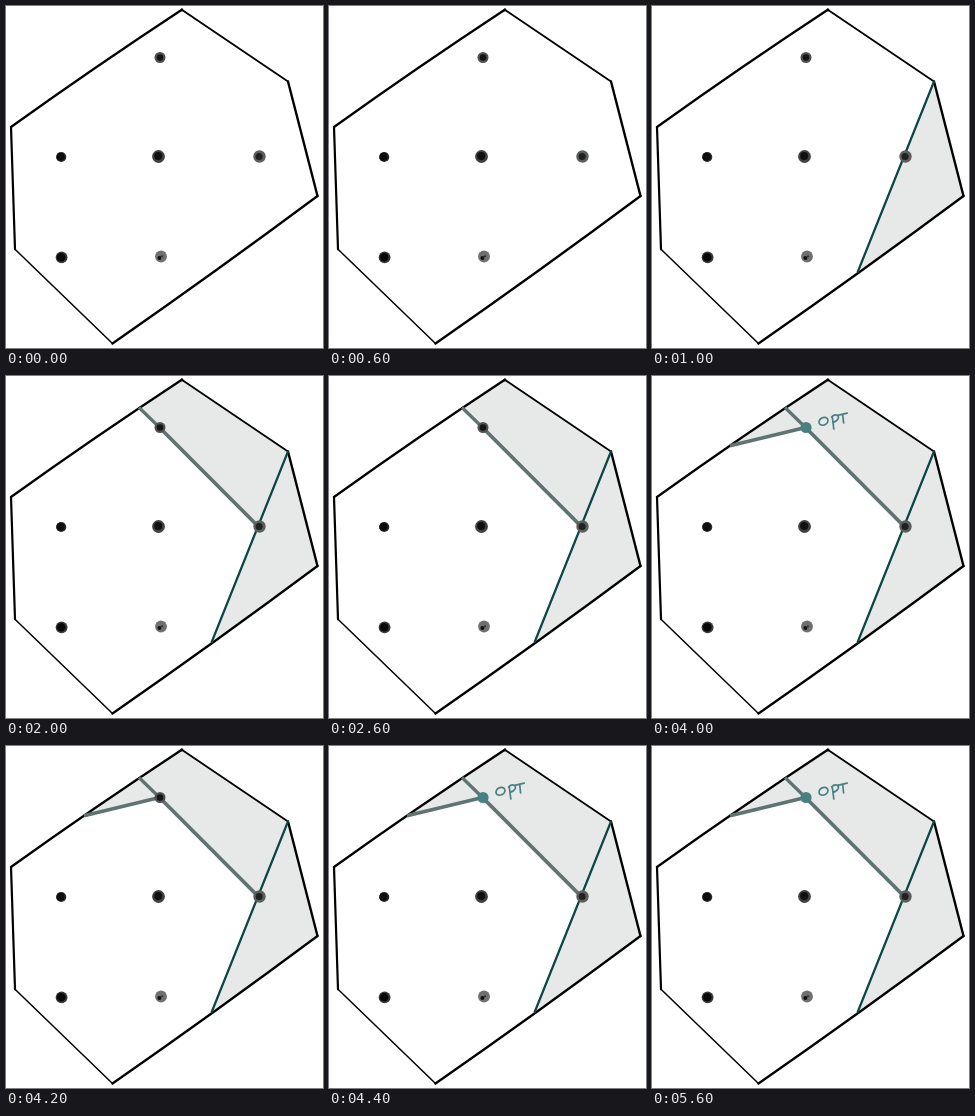
An HTML page with a canvas for the animation above (6.4 s loop, 317 px wide and 342 px high).

```html
<!DOCTYPE html>
<html lang="en">
<head>
<meta charset="utf-8">
<title>Cutting a polygon</title>
<style>
html, body { margin: 0; width: 100%; height: 100%; overflow: hidden; background: #fff; }
canvas { display: block; width: 317px; height: 342px; }
</style>
</head>
<body>
<canvas id="stage" width="317" height="342"></canvas>
<script>
const canvas = document.getElementById('stage');
const ctx = canvas.getContext('2d');
const scale = window.devicePixelRatio || 1;
canvas.width = 317 * scale;
canvas.height = 342 * scale;

const LOOP = 6400;
const INK = '#000', SHADE = '#e7e9e8', TEAL = '#0b4645', SLATE = '#5f7372', MARK = '#478083';

// Corners of the polygon, clockwise from the peak
const peak = [175.8, 3.8], right = [282, 75.5], low = [311.5, 190],
      bottom = [106.5, 337.5], left = [9, 243.3], upper = [5, 121];
// Ends of the cuts
const foot = [205.7, 266], hub = [252.3, 150.5], apex = [153.5, 51.5],
      edgeA = [133, 31.5], edgeB = [78, 69.8];

function trace(points) {
  ctx.beginPath();
  points.forEach(p => ctx.lineTo(p[0], p[1]));
}

function area(points) {
  trace(points);
  ctx.fillStyle = SHADE;
  ctx.fill();
}

// A pen stroke that swells sideways by `bow` pixels in its middle
function stroke(a, b, color, width, bow = 0) {
  const dx = b[0] - a[0], dy = b[1] - a[1], k = 2 * bow / Math.hypot(dx, dy);
  ctx.beginPath();
  ctx.moveTo(a[0], a[1]);
  ctx.quadraticCurveTo(a[0] + dx / 2 + dy * k, a[1] + dy / 2 - dx * k, b[0], b[1]);
  ctx.strokeStyle = color;
  ctx.lineWidth = width;
  ctx.stroke();
}

function disc(x, y, r, color) {
  ctx.beginPath();
  ctx.arc(x, y, r, 0, Math.PI * 2);
  ctx.fillStyle = color;
  ctx.fill();
}

function dot(x, y, r, rim, core, coreR, dx = 0, dy = 0) {
  disc(x, y, r, rim);
  disc(x + dx, y + dy, coreR, core);
}

function outline() {
  stroke(upper, peak, INK, 2.3, 1);
  stroke(peak, right, INK, 1.8);
  stroke(right, low, INK, 2.4);
  stroke(low, bottom, INK, 2.3, 1);
  stroke(bottom, left, INK, 1.5);
  stroke(left, upper, INK, 2.2);
  disc(176, 4, 1.4, INK);
}

function dots(marked) {
  if (marked) disc(154, 51.5, 5.6, MARK);
  else dot(154, 51.5, 5.5, '#505252', '#151515', 3.3);
  dot(152.5, 150.5, 6.4, '#414141', '#101010', 4, -0.3, -0.6);
  dot(253.5, 150.5, 6.2, '#5c5e5e', '#202222', 3.5, -0.4);
  dot(55.6, 251.3, 5.9, '#383838', '#080808', 4.3, -0.4);
  dot(155, 250.5, 5.9, '#707070', '#111', 2, -1.6, 1.5);
  disc(156, 250.2, 1, '#2a2a2a');
  dot(55.2, 151, 5.1, '#2c2c2c', '#0d0d0d', 4.1, -0.6, -0.2);
}

function label() {
  ctx.strokeStyle = MARK;
  ctx.lineWidth = 1.7;
  ctx.beginPath();
  ctx.ellipse(171.5, 45.3, 4.7, 3.7, -0.5, 0, Math.PI * 2);
  ctx.moveTo(180.3, 41);
  ctx.lineTo(181.8, 53);
  ctx.moveTo(179.5, 41);
  ctx.bezierCurveTo(183, 37.5, 187.5, 39, 186.2, 42.5);
  ctx.quadraticCurveTo(185, 45.5, 181, 46.3);
  ctx.moveTo(186.6, 39.2);
  ctx.lineTo(195.2, 37.2);
  ctx.moveTo(190.7, 38.5);
  ctx.lineTo(191.6, 47);
  ctx.stroke();
}

function draw(t) {
  const marked = t >= 4000 && t < 4200 || t >= 4400;
  ctx.setTransform(scale, 0, 0, scale, 0, 0);
  ctx.fillStyle = '#fff';
  ctx.fillRect(0, 0, 317, 342);
  ctx.lineCap = 'round';
  ctx.lineJoin = 'round';

  if (t >= 1000) area([right, low, foot]);
  if (t >= 2000) area([edgeA, peak, right, hub]);
  if (t >= 3000) area([edgeA, apex, edgeB]);
  outline();
  if (t >= 1000) stroke(right, foot, TEAL, 2.2);

  ctx.lineCap = 'butt';
  if (t >= 2000) {
    stroke(edgeA, apex, SLATE, 3.2);
    stroke(apex, hub, SLATE, 3.8);
  }
  if (t >= 3000) stroke(edgeB, apex, SLATE, 3.6);

  ctx.lineCap = 'round';
  dots(marked);
  if (marked) label();
}

const start = performance.now();
function tick() {
  draw((performance.now() - start) % LOOP);
  requestAnimationFrame(tick);
}
tick();
</script>
</body>
</html>
```
